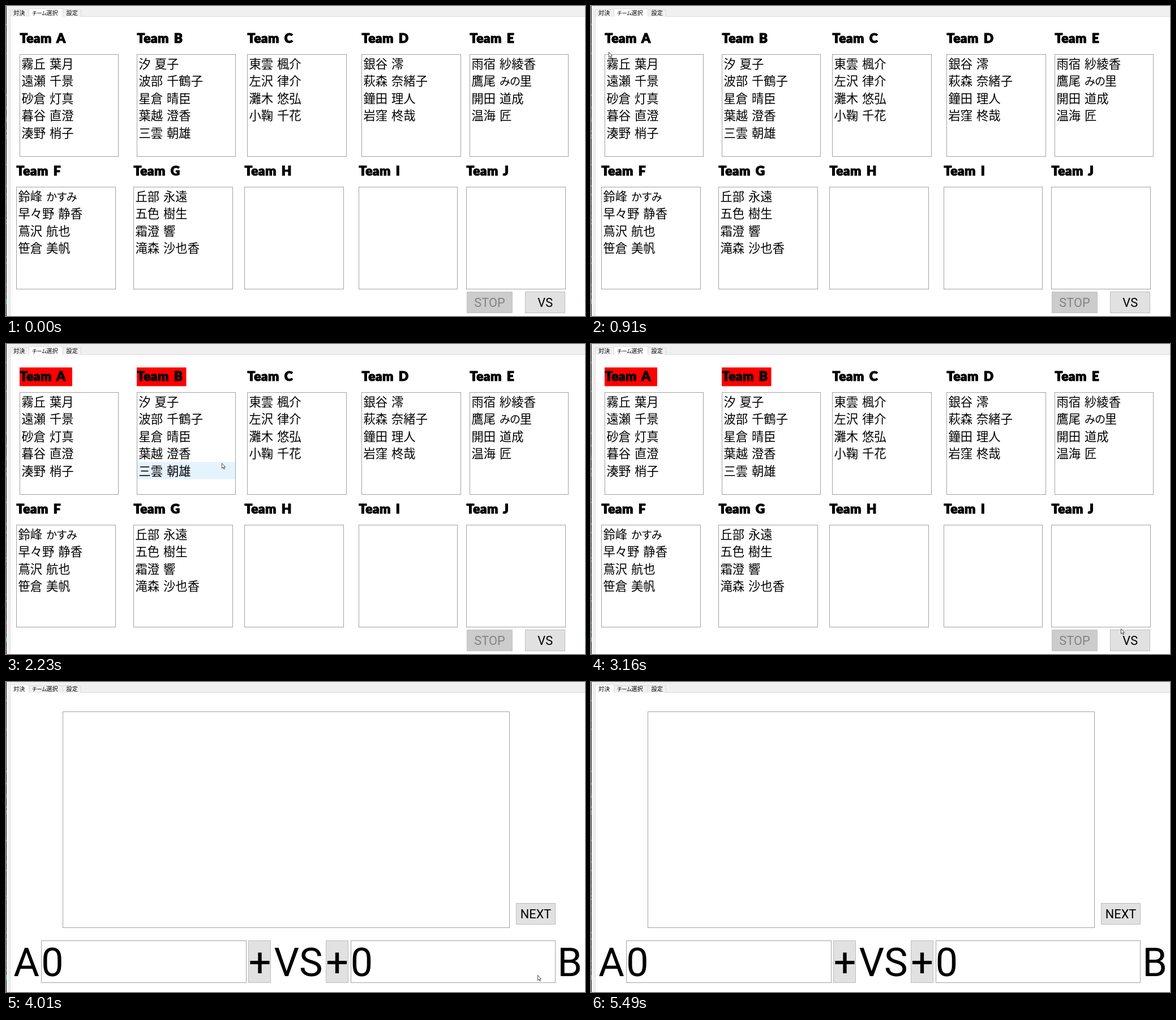
These frames come from a looping animation (1023x547 px, 5610 ms). An HTML page:

```html
<!DOCTYPE html>
<html lang="ja">
<head>
<meta charset="utf-8">
<title>チーム選択</title>
<style>
  html, body { margin: 0; width: 100%; height: 100%; overflow: hidden; background: #f0f0f0; }
  svg { display: block; width: 1023px; height: 547px; }
  .title { font: 900 22.8px Lato, sans-serif; stroke: #000; stroke-width: 1.1px; letter-spacing: .4px; word-spacing: 3.2px; }
  .name { font: 350 21.3px "Noto Sans CJK JP", "Noto Sans CJK", sans-serif; word-spacing: 2.2px; }
  .tab { font: 350 10.2px "Noto Sans CJK JP", "Noto Sans CJK", sans-serif; }
  .button, .big { font: 21.8px Roboto, sans-serif; text-anchor: middle; }
  .big { font-size: 70px; }
  .kana { font-size: .9em; letter-spacing: -.07em; }
</style>
</head>
<body>
<svg id="stage" viewBox="0 0 1023 547"></svg>
<script>
const LOOP = 5610;
const ROW = 30.5;
const teams = [
  ['霧丘 葉月', '遠瀬 千景', '砂倉 灯真', '暮谷 直澄', '湊野 梢子'],
  ['汐 夏子', '波部 千鶴子', '星倉 晴臣', '葉越 澄香', '三雲 朝雄'],
  ['東雲 楓介', '左沢 律介', '灘木 悠弘', '小鞠 千花'],
  ['銀谷 澪', '萩森 奈緒子', '鐘田 理人', '岩窪 柊哉'],
  ['雨宿 紗綾香', '鷹尾 みの里', '開田 道成', '温海 匠'],
  ['鈴峰 かすみ', '早々野 静香', '蔦沢 航也', '笹倉 美帆'],
  ['丘部 永遠', '五色 樹生', '霜澄 響', '滝森 沙也香'],
  [], [], []
];
const columns = [23.6, 230.5, 426.4, 628.2, 818.5];
const lists = teams.map((names, i) => {
  const left = columns[i % 5] - (i > 4 ? 5.6 : 0);
  return { names, x: Math.round(left), x2: Math.round(left + 174.8), y: i > 4 ? 319 : 85 };
});

const fill = (x, y, w, h, color, extra = '') =>
  `<rect x="${x}" y="${y}" width="${w}" height="${h}" fill="${color}" ${extra}/>`;
// Outlined box between two corner pixels
const box = (x, y, x2, y2, color = '#fff', line = '#a2a2a2', extra = '') =>
  fill(x + .5, y + .5, x2 - x, y2 - y, color, `stroke="${line}" ${extra}`);
const text = (kind, x, y, s, color = '#000') =>
  `<text class="${kind}" x="${x}" y="${y}" fill="${color}">` +
  s.replace(/[\u3041-\u30ff]+/g, '<tspan class="kana">$&</tspan>') + '</text>';

function tabs(active) {
  return [['対決', 7, 40, 13], ['チーム選択', 40, 100, 46], ['設定', 100, 132, 106.5]]
    .map(([label, x, x2, tx], i) => {
      const on = i === active, top = on ? 4 : 6;
      return `<path d="M${x + .5} 19V${top + .5}H${x2 + .5}V19" fill="${on ? '#fff' : '#f0f0f0'}" stroke="#dcdcdc"/>` +
        (on ? fill(x + 1, 18, x2 - x - 1, 3, '#fff') : '') +
        text('tab', tx, on ? 15.5 : 16, label);
    }).join('');
}

function edge() {
  let seed = 7, out = fill(0, 0, 1, 547, '#1d1d1b');
  const random = () => (seed = seed * 16807 % 2147483647) / 2147483647;
  for (let i = 0; i < 40; i++)
    out += fill(0, Math.floor(random() * 540), 1, 3, random() < .4 ? '#68682c' : '#3a3a3a');
  return out + fill(0, 517, 1, 9, '#159a9a');
}

const teamScreen = tabs(1) +
  fill(24, 41.4, 93, 33, '#f00', 'id="redA"') + fill(231, 41.4, 87.5, 33, '#f00', 'id="redB"') +
  lists.map(({ x, x2, y }, i) =>
    text('title', x + .6, y - 20, 'Team ' + 'ABCDEFGHIJ'[i]) + box(x, y, x2, y + 180)).join('') +
  fill(0, 0, 173, ROW, '#e5f3ff', 'id="rowHover"') +
  lists.map(({ names, x, y }) =>
    names.map((s, i) => text('name', x + 3.5, y + 24.5 + i * ROW, s)).join('')).join('') +
  box(814, 504, 894, 541, '#ccc', '#c3c3c3') + text('button', 854.5, 531.3, 'STOP', '#838383') +
  box(917, 504, 987, 541, '#e1e1e1', '#bdbdbd') +
  box(917, 504, 987, 541, '#e5f1fb', '#0078d7', 'id="vsHover"') +
  text('button', 952.7, 531.3, 'VS');

const matchScreen = tabs(0) +
  box(100, 52, 889, 433) +
  box(901, 390, 970, 427, '#e1e1e1', '#bdbdbd') + text('button', 936, 417.3, 'NEXT') +
  box(62, 456, 424, 530) + box(609, 456, 970, 530) +
  box(428, 456, 467, 530, '#e1e1e1', '#bdbdbd') + box(565, 456, 604, 530, '#e1e1e1', '#bdbdbd') +
  [['A', 36], ['0', 82], ['+', 448.5], ['VS', 516.5], ['+', 585], ['0', 628.5], ['B', 996]]
    .map(([s, x]) => text('big', x, 518.7, s)).join('');

const $ = id => document.getElementById(id);
$('stage').innerHTML =
  fill(0, 0, 1023, 547, '#f0f0f0') + edge() +
  box(7, 18, 1030, 555, '#fff', '#dcdcdc') +
  `<g id="teams">${teamScreen}</g><g id="match">${matchScreen}</g>` +
  '<path id="cursor" d="M.5 .5V9.3L2.5 7.5L4 10.8L5.3 10.2L3.9 7H6.6Z" fill="#fff" stroke="#222" stroke-width=".8"/>';

const linear = q => q;
const smooth = q => q * q * (3 - 2 * q);
const speedUp = q => q ** 1.5;
const slowDown = q => 1 - (1 - q) ** 1.6;
// First step, last step, number of steps, end point, easing
const moves = [
  [460, 910, 7, 31, 81, smooth],
  [990, 1140, 3, 62, 62, slowDown],
  [1300, 1540, 4, 214, 61, smooth],
  [1620, 1620, 1, 226, 61, linear],
  [1770, 1850, 2, 255, 61, linear],
  [2080, 2230, 3, 381, 210, speedUp],
  [2310, 2310, 1, 475, 302, linear],
  [2460, 2690, 4, 880, 456, slowDown],
  [2860, 3160, 5, 936, 502, smooth],
  [3240, 3390, 3, 939, 517, slowDown],
  [4560, 4870, 5, 981, 549, smooth]
];

function pointer(t) {
  let x = 919, y = 514;
  for (const [start, end, steps, toX, toY, ease] of moves) {
    if (t < start) break;
    const step = t >= end ? steps : 1 + Math.floor((t - start) / (end - start) * (steps - 1) + .05);
    const q = ease(Math.min(1, step / steps));
    x += (toX - x) * q;
    y += (toY - y) * q;
  }
  return [Math.round(x), Math.round(y)];
}

const show = (id, on) => $(id).style.display = on ? '' : 'none';

function draw(now) {
  const t = now % LOOP, [x, y] = pointer(t);
  show('teams', t < 4010);
  show('match', t >= 4010);
  show('redA', t >= 1220);
  show('redB', t >= 2000);
  show('cursor', t >= 380 && t < 4870);
  $('cursor').setAttribute('transform', `translate(${x} ${y})`);

  const rowAt = list => Math.floor((y - list.y - 1) / ROW);
  const hit = t >= 380 && lists.find(l =>
    x > l.x && x < l.x2 && rowAt(l) >= 0 && rowAt(l) < l.names.length);
  show('rowHover', hit);
  if (hit) {
    $('rowHover').setAttribute('x', hit.x + 1);
    $('rowHover').setAttribute('y', hit.y + 1 + rowAt(hit) * ROW);
  }

  const pressed = t >= 3930;
  show('vsHover', t >= 3240);
  $('vsHover').setAttribute('opacity', Math.min(4, 1 + Math.floor((t - 3240) / 76)) / 4);
  $('vsHover').setAttribute('fill', pressed ? '#cce4f7' : '#e5f1fb');
  $('vsHover').setAttribute('stroke', pressed ? '#005499' : '#0078d7');
  requestAnimationFrame(draw);
}
requestAnimationFrame(draw);
</script>
</body>
</html>
```
